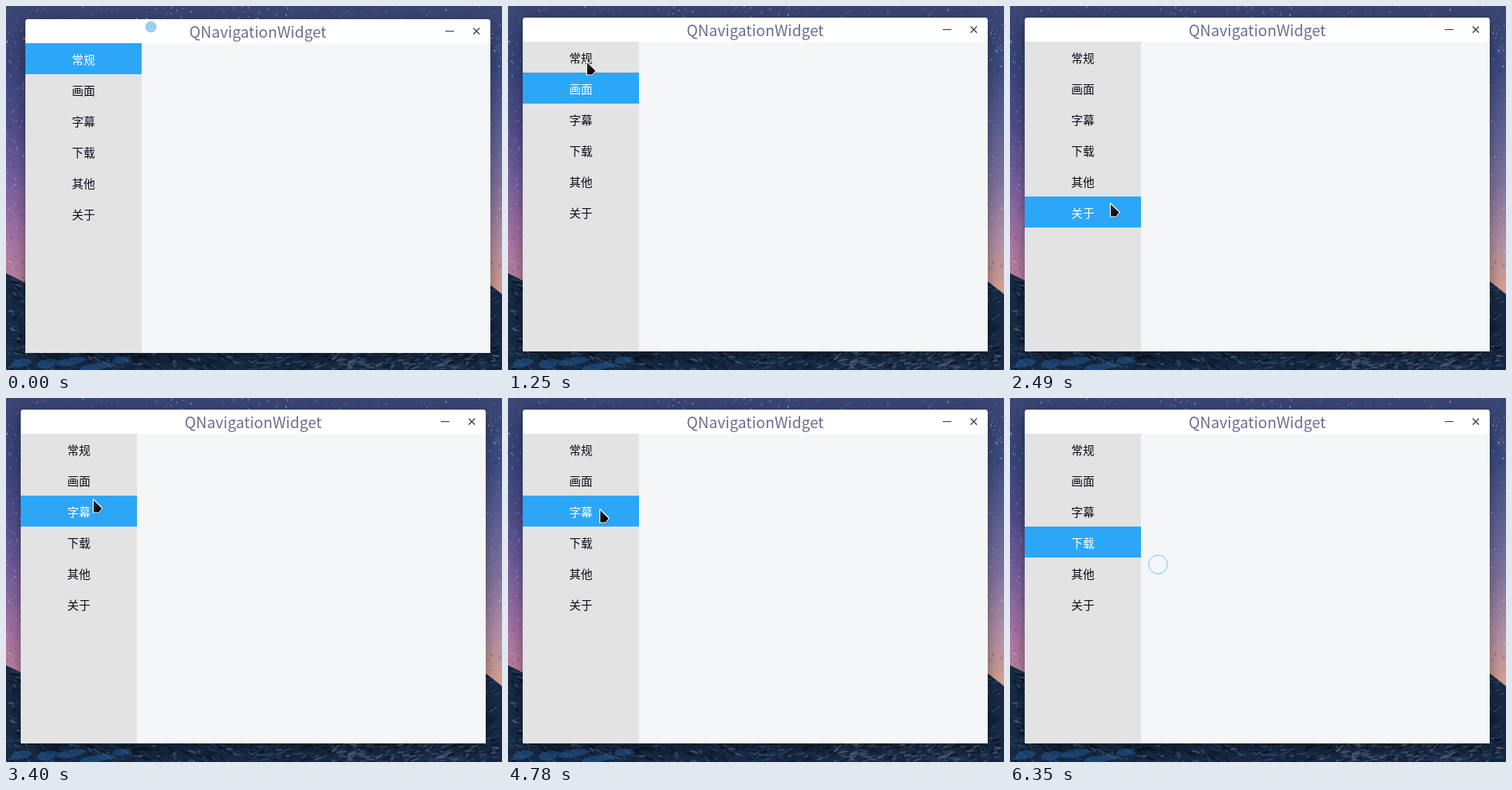
Animation of 640 by 470 pixels, one loop 6.39 s. Source, as an HTML page with a canvas:

```html
<!DOCTYPE html>
<html lang="zh">
<head>
<meta charset="utf-8">
<style>
html, body { margin: 0; width: 100%; height: 100%; overflow: hidden; background: #17203a; }
#stage { position: relative; width: 640px; height: 470px; overflow: hidden; }
canvas, svg { position: absolute; left: 0; top: 0; }
#win {
  position: absolute; left: 0; top: 0; width: 600px; height: 431px;
  border-radius: 4px 4px 0 0; background: #f4f6f8;
  box-shadow: 0 5px 20px rgba(0, 0, 0, .42);
}
text { font-family: "Noto Sans CJK SC", "Noto Sans CJK", "Noto Sans", sans-serif; text-anchor: middle; }
</style>
</head>
<body>
<div id="stage">
  <canvas id="sky" width="640" height="470"></canvas>
  <div id="win">
    <svg width="600" height="431">
      <path d="M0 31V4Q0 0 4 0H596Q600 0 600 4V31Z" fill="#fff"/>
      <rect y="31" width="150" height="400" fill="#e3e3e3"/>
      <rect id="bar" y="31" width="150" height="40" fill="#2ca7f8"/>
      <text x="300" y="24" font-size="19.6" fill="#6b6e8e">QNavigationWidget</text>
      <path d="M542 15.5H553M578 11.5L586 19.5M586 11.5L578 19.5" stroke="#303030" stroke-width="1.1" fill="none"/>
      <g id="menu" font-size="15" font-weight="500"></g>
    </svg>
  </div>
  <svg width="640" height="470">
    <defs>
      <linearGradient id="ink" x2="1" y2="1">
        <stop stop-color="#333"/><stop offset=".7" stop-color="#080808"/>
      </linearGradient>
    </defs>
    <circle id="tap"/>
    <g id="cursor">
      <path d="M0 2L13 13.5L8 19.5H0Z" opacity=".18"/>
      <path d="M-.5 .5L11.5 12.5L7 18H-.5Z" fill="url(#ink)" stroke="#fff" stroke-width="1.1" stroke-linejoin="round"/>
    </g>
  </svg>
</div>
<script>
const LOOP = 6390;
const DROP = 640;    // the dragged window is let go and the pointer shows
const LEAVE = 5800;  // the pointer leaves the menu
const TAP = 6310;    // the closing click
const LAG = 40;      // the highlight trails the pointer
const $ = id => document.getElementById(id);
const clamp = (v, lo, hi) => Math.min(hi, Math.max(lo, v));

// Turning points of the pointer: [time, x, y]
const turns = [
  [DROP, 150, 40], [730, 104, 62], [1000, 104, 62], [1210, 106, 108], [1250, 102, 71],
  [1600, 110, 108], [2280, 126, 228], [2410, 126, 228], [2470, 130, 252], [2700, 132, 264],
  [3020, 128, 206], [3400, 113, 130], [3680, 110, 60], [4050, 134, 347], [4380, 135, 356],
  [4990, 116, 108], [5120, 118, 62], [5350, 144, 241], [LEAVE, 136, 190],
  [5960, 306, 90], [6090, 300, 272], [6270, 191, 215]
];

const items = ['常规', '画面', '字幕', '下载', '其他', '关于'].map((label, i) => {
  const el = document.createElementNS('http://www.w3.org/2000/svg', 'text');
  el.setAttribute('x', 75);
  el.setAttribute('y', 58 + i * 40);
  el.textContent = label;
  return $('menu').appendChild(el);
});

function pointer(t) {
  const next = turns.findIndex(p => p[0] > t);
  if (next < 0) return turns[turns.length - 1].slice(1);
  const b = turns[next], a = turns[next - 1] || b;
  const k = a === b ? 0 : Math.sin((t - a[0]) / (b[0] - a[0]) * Math.PI / 2);
  return [1, 2].map(n => Math.round(a[n] + (b[n] - a[n]) * k));
}

function selectedRow(t) {
  if (t < 1000) return 0;
  const y = pointer(Math.min(t - LAG, LEAVE))[1];
  return clamp(Math.floor((y - 46) / 40), 0, 5);
}

function paintSky() {
  const c = $('sky').getContext('2d');
  let seed = 7;
  const rnd = () => (seed = seed * 16807 % 2147483647) / 2147483647;
  const pick = list => list[Math.floor(rnd() * list.length)];

  function wash(x, colors) {
    const g = c.createLinearGradient(0, 0, 0, 380);
    colors.forEach((col, i) => g.addColorStop(i / (colors.length - 1), col));
    c.fillStyle = g;
    c.fillRect(x, 0, 320, 470);
  }

  function dots(n, bottom, size, colors, alpha) {
    for (let i = 0; i < n; i++) {
      c.globalAlpha = alpha * (.3 + .7 * rnd());
      c.fillStyle = pick(colors);
      const s = size * (.5 + rnd());
      c.beginPath();
      c.ellipse(rnd() * 640, rnd() * bottom, s * .6, s, .4, 0, 7);
      c.fill();
    }
  }

  // Slanted rock and snow, running down from both sides
  function streaks(n, top, length, colors, alpha) {
    for (let i = 0; i < n; i++) {
      const x = rnd() * 640, y = top + rnd() * (470 - top);
      const dx = length * (.3 + rnd()) * (x < 320 ? 1 : -1);
      c.globalAlpha = alpha * (.4 + .6 * rnd());
      c.strokeStyle = pick(colors);
      c.lineWidth = .8 + rnd() * 2;
      c.beginPath();
      c.moveTo(x, y);
      c.lineTo(x + dx, y + length * (rnd() * .8 - .1));
      c.stroke();
    }
  }

  wash(0, ['#3a4672', '#37457a', '#504d8a', '#76609f', '#a874a4', '#c58b9c']);
  wash(320, ['#3a4672', '#3b4b80', '#5b6094', '#80739f', '#b38fa6', '#dca48c']);
  dots(1800, 370, 1.6, ['#2b3762', '#8593bd'], .35);
  dots(1700, 355, .9, ['#dce6fa', '#b7c8ee'], .8);

  c.globalAlpha = 1;
  c.fillStyle = '#172a44';
  c.beginPath();
  [[0, 345], [26, 358], [320, 440], [600, 352], [613, 351], [640, 372], [640, 470], [0, 470]]
    .forEach(p => c.lineTo(...p));
  c.fill();
  c.save();
  c.clip();
  streaks(1500, 345, 11, ['#060a14', '#0c1626', '#25466a', '#32577e'], .75);
  streaks(700, 360, 7, ['#4d6d92', '#6f84a4', '#0a1220'], .6);
  for (let i = 0; i < 5; i++) {
    c.globalAlpha = .6;
    c.fillStyle = '#245a96';
    c.beginPath();
    c.ellipse(20 + i * 32, 457 + rnd() * 9, 9 + rnd() * 14, 3 + rnd() * 3, -.15, 0, 7);
    c.fill();
  }
  c.beginPath();
  c.rect(420, 440, 220, 30);
  c.clip();
  streaks(500, 440, 9, ['#7d7994', '#52688e', '#0c1322'], .6);
  c.restore();
}

function setTap(x, y, r, filled) {
  const look = {
    cx: x, cy: y, r,
    fill: filled ? '#97d0f0' : 'none',
    stroke: filled ? '#8ac8ec' : '#72c3ef'
  };
  for (const key in look) $('tap').setAttribute(key, look[key]);
}

function draw(t) {
  const drag = clamp((t - 40) / 690, 0, 1);
  const wx = Math.round(25 - 6 * drag), wy = Math.round(17 - 2 * drag);
  $('win').style.transform = `translate(${wx}px, ${wy}px)`;

  const row = selectedRow(t);
  $('bar').setAttribute('y', 31 + row * 40);
  items.forEach((el, i) => el.setAttribute('fill', i === row ? '#fff' : '#0c0c18'));

  const [x, y] = pointer(t);
  $('cursor').setAttribute('transform', `translate(${x} ${y})`);
  $('cursor').style.display = t >= DROP && t < TAP ? '' : 'none';

  $('tap').style.display = t < DROP || t >= TAP ? '' : 'none';
  if (t < DROP) setTap(wx + 162, wy + 10, 6.7, true);
  else setTap(191, 215, Math.min(12, 9 + (t - TAP) / 13), false);
}

paintSky();
const start = performance.now();
function tick() {
  draw((performance.now() - start) % LOOP);
  requestAnimationFrame(tick);
}
tick();
</script>
</body>
</html>
```
